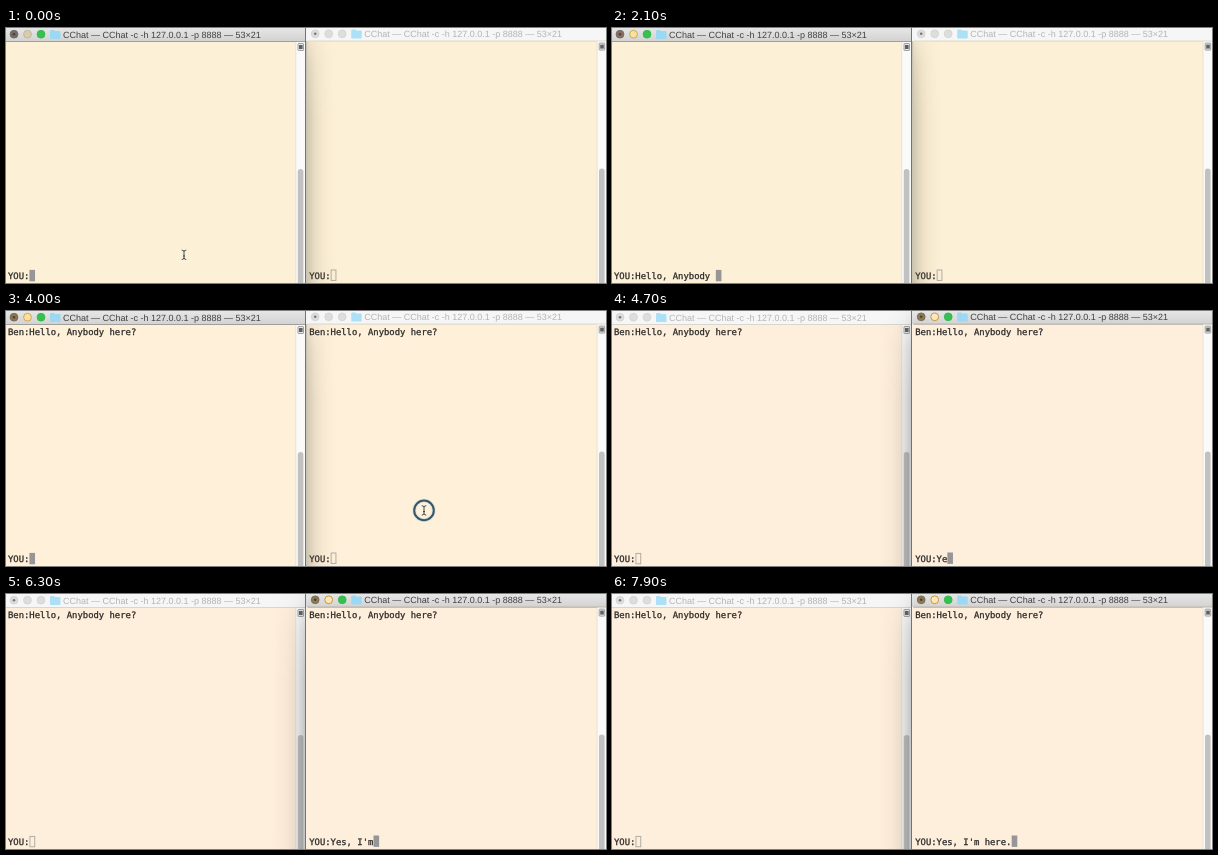
An HTML page that plays this animation: 600x255 px, repeating every 8 s.

```html
<!DOCTYPE html>
<html lang="en">
<head>
<meta charset="utf-8">
<title>Terminal chat</title>
<style>
  html, body { margin: 0; width: 100%; height: 100%; overflow: hidden; background: #fcf0d6; }
  svg { display: block; width: 600px; height: 255px; }
  text { text-rendering: geometricPrecision; white-space: pre; }
  .title { font: 9px "Liberation Sans", Arial, sans-serif; }
  .mono { font: 8.9px "DejaVu Sans Mono", monospace; fill: #2b2a28; stroke: #2b2a28; stroke-width: .28; }
</style>
</head>
<body>
<svg id="stage" viewBox="0 0 600 255" xmlns="http://www.w3.org/2000/svg">
  <defs>
    <linearGradient id="bar" x2="0" y2="1">
      <stop offset="0" stop-color="#e8e8e8"/><stop offset="1" stop-color="#d3d3d3"/>
    </linearGradient>
    <linearGradient id="shadeR">
      <stop offset="0" stop-color="#5c5a48" stop-opacity=".3"/>
      <stop offset=".3" stop-color="#6a6450" stop-opacity=".14"/>
      <stop offset=".65" stop-color="#a08868" stop-opacity=".05"/>
      <stop offset="1" stop-color="#a08868" stop-opacity="0"/>
    </linearGradient>
    <linearGradient id="shadeL">
      <stop offset="0" stop-color="#807858" stop-opacity="0"/>
      <stop offset=".4" stop-color="#807858" stop-opacity=".05"/>
      <stop offset=".75" stop-color="#605e58" stop-opacity=".14"/>
      <stop offset="1" stop-color="#505458" stop-opacity=".32"/>
    </linearGradient>
    <linearGradient id="fade" x2="0" y2="1">
      <stop offset="0" stop-color="#fff" stop-opacity=".15"/>
      <stop offset=".15" stop-color="#fff" stop-opacity=".75"/>
      <stop offset=".35" stop-color="#fff"/>
    </linearGradient>
    <mask id="soft" maskUnits="userSpaceOnUse" x="0" y="0" width="600" height="255">
      <rect width="600" height="255" fill="url(#fade)"/>
    </mask>
  </defs>
</svg>
<script>
const LOOP = 8000, ADVANCE = 5.36, PROMPT = 'YOU:';
const SENT = 3300, FOCUS = 4200;
const POST = 'Ben:Hello, Anybody here?';

// Key press times, one per character
const lines = [
  { text: 'Hello, Anybody here?',
    at: [400, 500, 700, 800, 900, 1000, 1200, 1300, 1500, 1600,
         1700, 1800, 1900, 2000, 2100, 2500, 2600, 2700, 2800, 3000] },
  { text: "Yes, I'm here.",
    at: [4500, 4600, 4900, 5300, 5500, 5900, 6100, 6200, 6400,
         6600, 6700, 6800, 6900, 7400] }
];

const looks = [
  { t: 0, bg: '#fcf0d6', close: '#716d67', mini: '#d8cbae', edge: '#c2b699' },
  { t: 1500, bg: '#fcf0d6', close: '#8a6e65', mini: '#fbe0a0', edge: '#c6a350' },
  { t: 3400, bg: '#fef0d9', close: '#8b7848', mini: '#fbe2a4', edge: '#cc9f48' },
  { t: 4300, bg: '#feeedc', close: '#8c7a50', mini: '#fde6b8', edge: '#c68e32' }
];

const stage = document.getElementById('stage');

function add(parent, tag, attrs, text) {
  const el = document.createElementNS('http://www.w3.org/2000/svg', tag);
  set(el, attrs);
  if (text) el.textContent = text;
  parent.appendChild(el);
  return el;
}

function set(el, attrs) {
  for (const key in attrs) el.setAttribute(key, attrs[key]);
}

function makeWindow(x, y, width) {
  const g = add(stage, 'g', { transform: `translate(${x} ${y})` });
  const track = width - 9;
  const body = add(g, 'rect', { y: 13, width, height: 243 });
  const bar = add(g, 'rect', { y: -1, width, height: 14 });
  const rule = add(g, 'rect', { y: 13, width, height: 1 });

  const lights = [8, 21.5, 35].map(cx =>
    add(g, 'circle', { cx, cy: 6.2, r: 3.9, 'stroke-width': .9 }));
  const dot = add(g, 'circle', { cx: 8, cy: 6.2, r: 1.3 });
  const folder = add(g, 'path', { d: 'M44 3q0-1 1-1h3l1 1h4.5q1 0 1 1v6q0 1-1 1h-8.5q-1 0-1-1z' });
  const title = add(g, 'text', { x: 57, y: 9.5, class: 'title' },
    'CChat — CChat -c -h 127.0.0.1 -p 8888 — 53×21');

  add(g, 'rect', { x: track, y: 14, width: 9.5, height: 242, fill: '#fafafa' });
  add(g, 'rect', { x: track - .5, y: 14, width: .7, height: 242, fill: '#e2dccf' });
  add(g, 'rect', { x: track + 1.8, y: 141, width: 5.6, height: 120, rx: 2.8, fill: '#c1c1c1' });
  add(g, 'rect', { x: track + 2, y: 15.5, width: 5.5, height: 7, rx: .6,
    fill: '#e8e8e8', stroke: '#8c8c8c', 'stroke-width': .8 });
  add(g, 'rect', { x: track + 3, y: 17, width: 3.6, height: 4, fill: '#606060' });

  const post = add(g, 'text', { x: 2, y: 24, class: 'mono' }, POST);
  const input = add(g, 'text', { x: 2, y: 251.2, class: 'mono' }, PROMPT);
  const caret = add(g, 'rect', { 'stroke-width': .9 });
  return { body, bar, rule, lights, dot, folder, title, post, input, caret };
}

const wins = [makeWindow(0, 0, 299), makeWindow(301.2, -.4, 299)];
const shades = [
  add(stage, 'rect', { x: 300, y: 14, width: 29, height: 241, fill: 'url(#shadeR)', mask: 'url(#soft)' }),
  add(stage, 'rect', { x: 266, y: 0, width: 33, height: 255, fill: 'url(#shadeL)', mask: 'url(#soft)' })
];
const gap = add(stage, 'rect', { x: 299, y: 13, width: 2.2, height: 242 });
const gapBar = add(stage, 'rect', { x: 299, width: 2.2, height: 13 });
add(stage, 'rect', { x: 299, width: 1, height: 255, fill: '#6a7777' });

const mouse = add(stage, 'g', { fill: 'none' });
const ring = add(mouse, 'g', {});
add(ring, 'circle', { r: 9.8, stroke: '#dbe3df', 'stroke-width': 3.8 });
add(ring, 'circle', { r: 9.8, stroke: '#3b5563', 'stroke-width': 2 });
const beam = 'M-2.3-4.7Q0-4.7 0-3Q0-4.7 2.3-4.7M0-3V3M-2.3 4.7Q0 4.7 0 3Q0 4.7 2.3 4.7M-1 1.2H1';
add(mouse, 'path', { d: beam, stroke: '#fff', 'stroke-width': 2, opacity: .6 });
add(mouse, 'path', { d: beam, stroke: '#333', 'stroke-width': .9 });

function show(el, on) {
  el.style.display = on ? '' : 'none';
}

function paintWindow(w, active, look, typed, posted) {
  set(w.body, { fill: look.bg });
  set(w.bar, { fill: active ? 'url(#bar)' : '#f6f6f6' });
  set(w.rule, { fill: active ? '#a09f9b' : '#d8d6d0' });
  const fills = active ? [look.close, look.mini, '#35c04f'] : Array(3).fill('#dddddb');
  const edges = active ? ['#75695a', look.edge, '#35b84d'] : Array(3).fill('#d4d4d2');
  w.lights.forEach((el, i) => set(el, { fill: fills[i], stroke: edges[i] }));
  set(w.dot, { fill: active ? '#4b4238' : '#77777a' });
  set(w.folder, { fill: active ? '#9ad8f3' : '#ace0f7' });
  set(w.title, { fill: active ? '#404040' : '#b4b4b4' });
  show(w.post, posted);
  w.input.textContent = PROMPT + typed;
  const x = 2 + (PROMPT.length + typed.length) * ADVANCE;
  set(w.caret, active
    ? { x, y: 241.9, width: 5.6, height: 11.4, fill: '#969696', stroke: 'none' }
    : { x: x + .5, y: 242.4, width: 4.8, height: 10.4, fill: 'none', stroke: '#a9a69e' });
}

function typedAt(line, t) {
  return line.text.slice(0, line.at.filter(k => k <= t).length);
}

function paintMouse(t) {
  show(mouse, t < lines[0].at[0] || (t >= 3400 && t < lines[1].at[0]));
  show(ring, t >= 3900 && t < FOCUS);
  const p = Math.min(1, Math.max(0, (t - 3400) / 500));
  const e = p * p * (3 - 2 * p);
  set(mouse, { transform: `translate(${178 + 240 * e} ${226.8 - 27.4 * e})` });
}

function render(t) {
  const look = looks.filter(l => l.t <= t).pop();
  const right = t >= FOCUS, posted = t >= SENT;
  paintWindow(wins[0], !right, look, posted ? '' : typedAt(lines[0], t), posted);
  paintWindow(wins[1], right, look, typedAt(lines[1], t), posted);
  show(shades[0], !right);
  show(shades[1], right);
  set(gap, { fill: right ? look.bg : '#cac4b2' });
  set(gapBar, { fill: right ? 'url(#bar)' : '#f6f6f6' });
  paintMouse(t);
}

const start = performance.now();
function tick() {
  render((performance.now() - start) % LOOP);
  requestAnimationFrame(tick);
}
tick();
</script>
</body>
</html>
```
